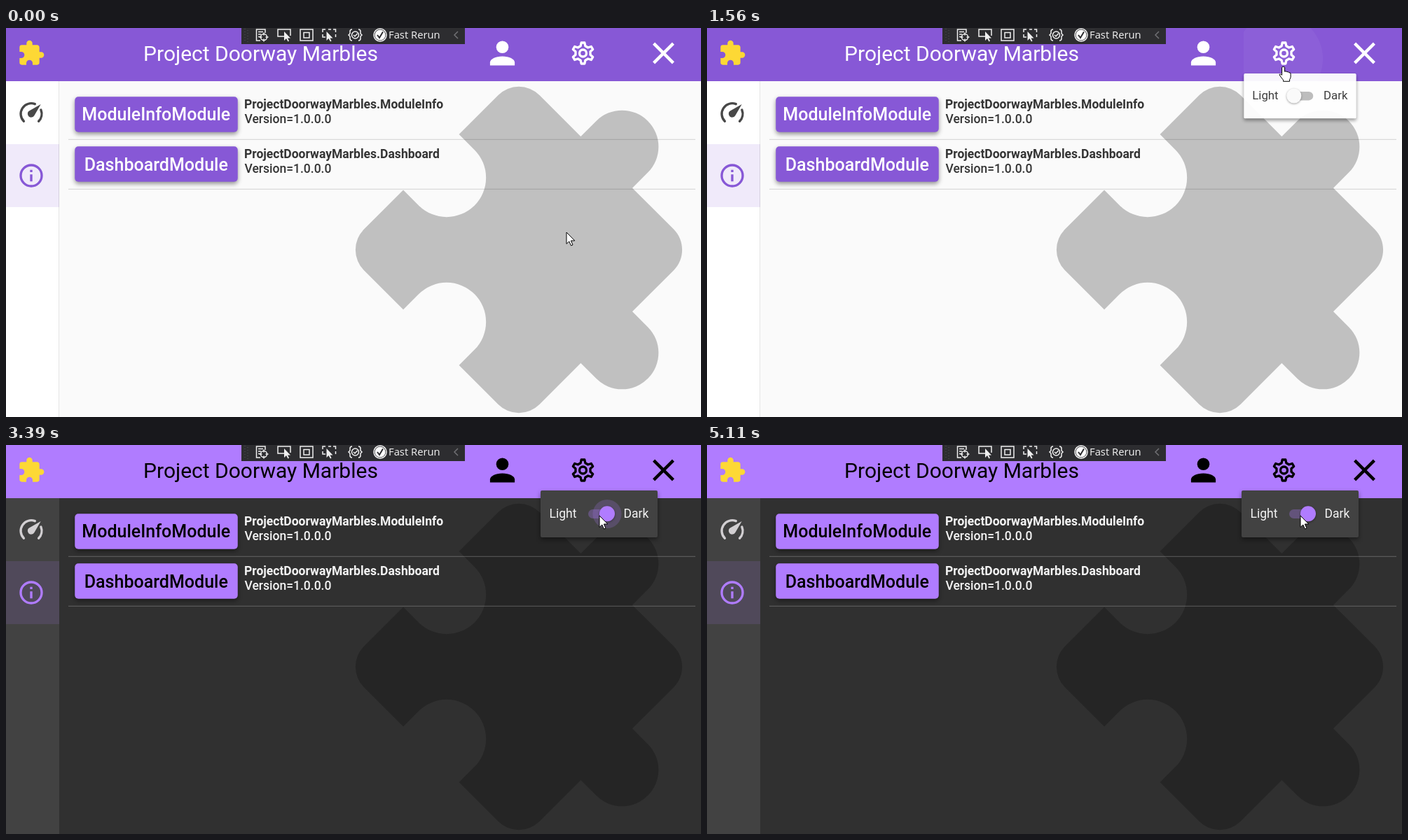
These frames come from a looping animation (992x556 px, 6160 ms). An HTML page:

```html
<!DOCTYPE html>
<html lang="en">
<head>
<meta charset="utf-8">
<title>Theme switch</title>
<style>
  html, body { margin: 0; width: 100%; height: 100%; overflow: hidden; }
  svg {
    display: block; width: 992px; height: 556px;
    font: 17.5px Roboto, sans-serif;
    --accent: #8758d6; --on-accent: #fff; --page: #fafafa; --paper: #fff;
    --text: #343434; --icon: #484848; --line: rgba(0,0,0,.13); --edge: rgba(0,0,0,.1);
    --track: rgba(0,0,0,.27); --thumb: #fafafa;
  }
  svg.dark {
    --accent: #b07cff; --on-accent: #000; --page: #303030; --paper: #424242;
    --text: #f4f4f4; --icon: #d2cfd2; --line: rgba(255,255,255,.2); --edge: transparent;
    --track: rgba(255,255,255,.3);
  }
  .accent { fill: var(--accent); }
  .on-accent { fill: var(--on-accent); }
  .paper { fill: var(--paper); }
  .text { fill: var(--text); }
  .outline { fill: none; stroke: var(--on-accent); }
  .raised { filter: drop-shadow(0 3px 3px rgba(0,0,0,.42)); }
  .caption { font-size: 25px; font-weight: 500; text-anchor: middle; }
  .version { font-weight: 500; }
  .tools { fill: none; stroke: #f0f0f0; stroke-width: 1.5; }
  .pointer { fill: #fff; stroke: #000; stroke-linejoin: round; }
</style>
</head>
<body>
<svg id="stage" viewBox="0 0 992 556">
  <defs>
    <path id="puzzle" d="M20.5 11H19V7C19 5.9 18.1 5 17 5H13V3.5A2.5 2.5 0 0 0 8 3.5V5H4A2 2 0 0 0 2 7V10.8H3.5A2.7 2.7 0 0 1 3.5 16.2H2V20A2 2 0 0 0 4 22H7.8V20.5A2.7 2.7 0 0 1 13.2 20.5V22H17A2 2 0 0 0 19 20V16H20.5A2.5 2.5 0 0 0 20.5 11Z"/>
    <clipPath id="gearButton"><rect x="766" width="115" height="76"/></clipPath>
  </defs>

  <rect width="992" height="556" fill="var(--page)"/>
  <use href="#puzzle" opacity=".23" transform="translate(732 317) rotate(45) scale(20.83) translate(-10.5 -13.5)"/>

  <!-- side bar -->
  <rect class="paper" y="76" width="76" height="480"/>
  <rect class="accent" y="166" width="76" height="90" opacity=".125"/>
  <rect x="75" y="76" width="1" height="480" fill="var(--edge)"/>
  <g transform="translate(16 101) scale(1.667)" fill="none" stroke="var(--icon)" stroke-width="2" stroke-linecap="round">
    <path d="M5.64 19.36A9 9 0 0 1 15.2 4.6M20.3 9.6A9 9 0 0 1 18.36 19.36"/>
    <path d="M12 16A3 3 0 0 1 10.5 10.39L20.21 4.77L14.68 14.35A3 3 0 0 1 12 16" fill="var(--icon)" stroke="none"/>
  </g>
  <g transform="translate(16 191) scale(1.667)" class="accent">
    <circle cx="12" cy="12" r="9" fill="none" stroke="var(--accent)" stroke-width="2"/>
    <path d="M11 7h2v2h-2zM11 11h2v6h-2z"/>
  </g>

  <g id="modules"></g>

  <!-- header -->
  <rect class="accent" width="992" height="76"/>
  <use href="#puzzle" fill="#fdd835" transform="translate(16 16) scale(1.667)"/>
  <text class="on-accent" x="363.5" y="47" font-size="30" text-anchor="middle">Project Doorway Marbles</text>
  <g class="on-accent" transform="translate(708.5 36) scale(2.2)">
    <circle cy="-4" r="4"/><path d="M0 2C4.42 2 8 3.79 8 6V8H-8V6C-8 3.79-4.42 2 0 2Z"/>
  </g>
  <g class="outline" transform="translate(823.5 36) scale(1.667)" stroke-width="2" stroke-linejoin="round">
    <path id="gear"/><circle r="3"/>
  </g>
  <path class="outline" stroke-width="4.4" d="M924.6 22.1l27.8 27.8m0-27.8l-27.8 27.8"/>
  <circle id="gearRipple" cx="816" cy="44" fill="#fff" clip-path="url(#gearButton)"/>

  <!-- debug tool bar -->
  <rect x="336" width="319" height="23" fill="#2d2d30"/>
  <path d="M341 1v20M345 3v18" stroke="#55555a" stroke-dasharray="1 3"/>
  <g class="tools">
    <path d="M363 18H357.500V2H370V7M360 5.500h7M360 9h4M360 12.500h3"/>
    <circle cx="368" cy="13" r="4.500"/><path d="M368 6.500v4M368 15.500v4M361.500 13h4M370.500 13h4"/>
    <path d="M397 12H388V2H406V11M420 2H438V18H420ZM425 6.500H433V14H425Z"/>
    <path d="M452 6V2H456M460 2H464M467 2H470.500V6M452 9V13H456M470.500 9V13"/>
    <path id="pick" d="M397 5v13l3-3 2.500 4.500 1.500-1-2-4h4z" fill="#f0f0f0" stroke="none"/>
    <use href="#pick" x="60.500"/>
    <path d="M494 2Q491 2 491 5V8L489 10L491 12V15Q491 18 494 18M503 2Q506 2 506 5V8L508 10L506 12V15Q506 18 503 18"/>
    <circle cx="498.500" cy="10" r="5"/><path d="M496 10l2 2 3.500-4"/>
    <circle cx="534" cy="10" r="9"/><circle cx="534" cy="10" r="7.500" fill="#fff" stroke="none"/>
    <path d="M530 10l3 4 5-8.500" stroke="#2d2d30" stroke-width="2"/>
    <path d="M645 5l-5 5 5 5" stroke="#707074"/>
  </g>
  <text x="546" y="15" fill="#f4f4f4" font-size="14.8" font-family="Open Sans, sans-serif">Fast Rerun</text>

  <!-- theme popup -->
  <g id="popup">
    <rect class="paper raised" x="763" y="65" width="167" height="67" rx="2"/>
    <text class="text" x="775.500" y="104">Light</text>
    <text class="text" x="881.500" y="104">Dark</text>
    <rect id="track" x="831" y="92" width="35" height="13" rx="6.500"/>
    <circle id="ripple" class="accent" cy="98.500"/>
    <circle id="thumb" cy="98.300" r="11" style="filter:drop-shadow(0 1px 1.500px rgba(0,0,0,.4))"/>
  </g>

  <circle id="click" r="15.500" fill="#fff000" opacity=".58"/>
  <g id="cursor" class="pointer">
    <path id="arrow" d="M0 0V16.500L3.800 13L6.500 19L9 18L6.400 12H11.800Z"/>
    <path id="hand" d="M-1 2.500Q-1 1 1 1T3 2.500V8Q5 7 6.500 8.500Q8.500 8 9.200 9.500Q11 9 11.500 11V16Q11 18 10 19.500V22H1V20Q-2 17-4.500 12.500Q-4 10.500-1 13Z"/>
  </g>
</svg>
<script>
const $ = id => document.getElementById(id);
const set = (id, attrs) => { for (const k in attrs) $(id).setAttribute(k, attrs[k]); };
const span = (t, a, b) => Math.min(1, Math.max(0, (t - a) / (b - a)));
const ease = p => p * p * (3 - 2 * p);
const mix = (a, b, p) => a + (b - a) * p;
const within = (t, a, b) => t >= a && t < b;

$('modules').innerHTML = ['ModuleInfo', 'Dashboard'].map((name, i) => `
  <g transform="translate(0 ${i * 71})">
    <rect class="accent raised" x="98.250" y="98.300" width="232.500" height="50.500" rx="5"/>
    <text class="on-accent caption" x="214.300" y="${132 + i}">${name}Module</text>
    <text class="text" x="340" y="115" font-weight="700">ProjectDoorwayMarbles.${name}</text>
    <text class="text version" x="340.500" y="136">Version=1.0.0.0</text>
    <rect x="89" y="158.750" width="895" height="1.250" fill="var(--line)"/>
  </g>`).join('');

// One gear tooth, turned six times.
const tooth = [[-2, -6.15], [-1.4, -9], [1.4, -9], [2, -6.15]];
const teeth = [0, 1, 2, 3, 4, 5].flatMap(k => {
  const c = Math.cos(k * Math.PI / 3), s = Math.sin(k * Math.PI / 3);
  return tooth.map(([x, y]) => [x * c - y * s, x * s + y * c]);
});
set('gear', { d: 'M' + teeth.join('L') + 'Z' });

const LOOP = 6160;
// Each switch: pointer down, pointer up, theme change, ripple gone, ripple opacity left over
const switches = [
  { down: 1960, up: 2130, flip: 2280, end: 2480, rest: 0 },
  { down: 3270, up: 3330, flip: 3410, end: 3540, rest: .07 },
  { down: 4710, up: 4800, flip: 4910, end: 5100, rest: 0 }
];

function cursorAt(t) {
  if (t < 845) {
    const p = ease(span(t, 210, 830)), q = 1 - p;
    return [q * q * 800 + 2 * p * q * 854 + p * p * 817, mix(292, 52, p)];
  }
  if (t < 1400) return [mix(817, 816, span(t, 850, 920)), mix(52, 44, span(t, 850, 920))];
  const p = ease(span(t, 1450, 1860));
  return [mix(816, 847, p), mix(44, 101, p)];
}

function draw(t) {
  const flips = switches.filter(s => t >= s.flip).length;
  $('stage').classList.toggle('dark', flips % 2 === 1);

  const open = ease(span(t, 1330, 1600));
  set('popup', {
    opacity: open,
    transform: `translate(846 65) scale(${mix(.3, 1, open)}) translate(-846 -65)`
  });
  const wave = span(t, 1300, 1620);
  set('gearRipple', { r: 70 * Math.sqrt(wave), opacity: .22 * (1 - wave) });

  const on = switches.reduce((sum, s, i) => sum + (i % 2 ? -1 : 1) * ease(span(t, s.flip - 20, s.flip + 120)), 0);
  const thumbX = mix(837.5, 858, on);
  const checked = on > .5;
  set('thumb', { cx: thumbX, fill: checked ? 'var(--accent)' : 'var(--thumb)' });
  set('track', { fill: checked ? 'var(--accent)' : 'var(--track)', opacity: checked ? .3 : 1 });

  const last = switches.filter(s => t >= s.up).pop();
  const idle = !last || within(t, switches[2].down, switches[2].up);
  set('ripple', idle ? { r: 0, opacity: 0 } : {
    cx: thumbX,
    r: mix(8, 22.5, span(t, last.up, last.up + 80)) + (last.rest ? 1.5 : 0),
    opacity: mix(.2, last.rest, span(t, last.flip, last.end))
  });

  const [x, y] = cursorAt(t);
  const pressed = within(t, 980, 1300) || switches.some(s => within(t, s.down, s.up));
  set('cursor', { transform: `translate(${x} ${y})` });
  set('click', { cx: x, cy: y, visibility: pressed ? 'visible' : 'hidden' });
  set('hand', { visibility: y < 66 ? 'visible' : 'hidden' });
  set('arrow', { visibility: y < 66 ? 'hidden' : 'visible' });
}

const start = performance.now();
(function tick() {
  draw((performance.now() - start) % LOOP);
  requestAnimationFrame(tick);
})();
</script>
</body>
</html>
```
